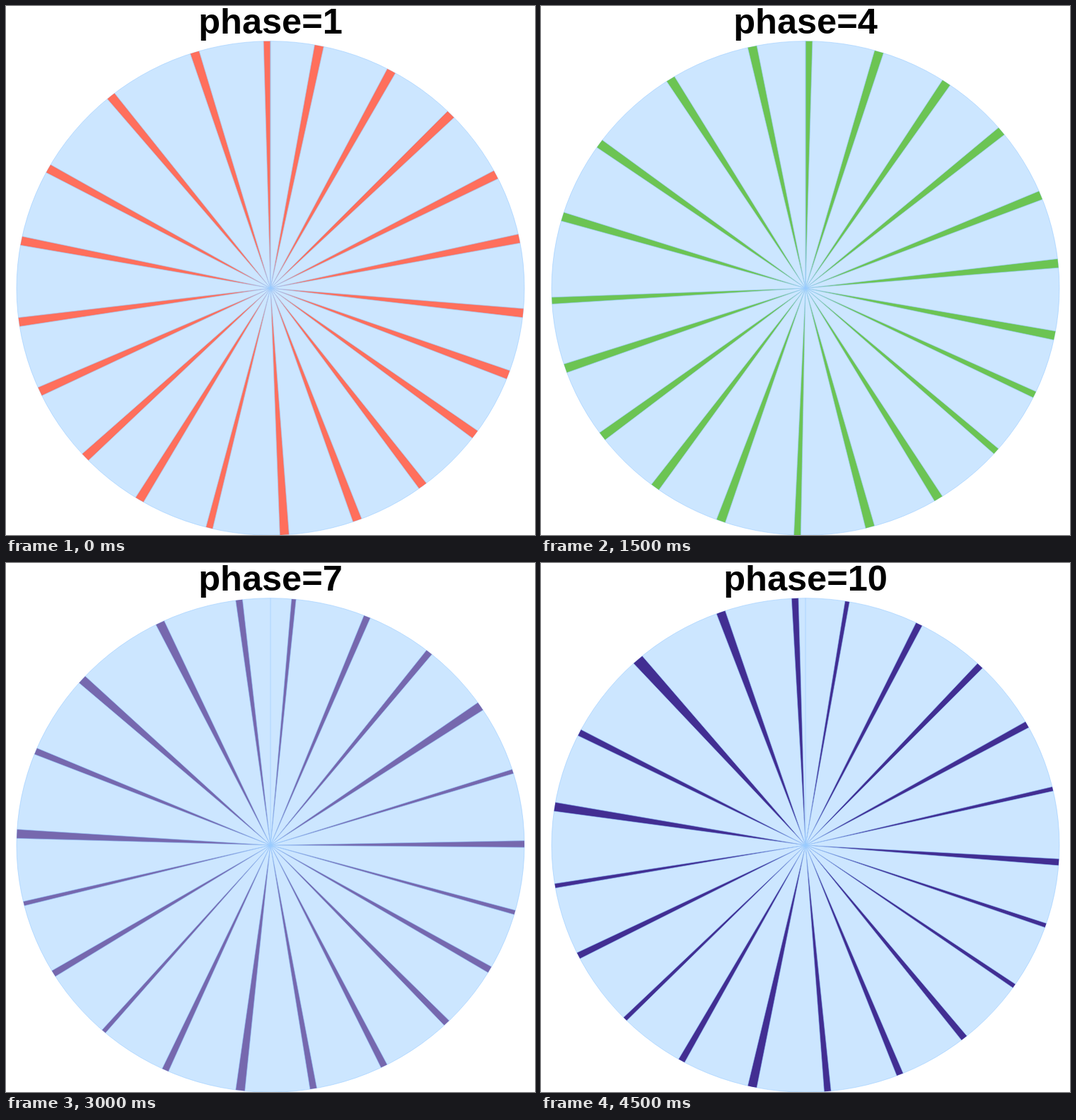
An HTML page with a canvas that plays this animation: 748 by 748 pixels, repeating every 5 s.

```html
<!DOCTYPE html>
<html lang="en">
<head>
<meta charset="utf-8">
<title>Phase wheel</title>
<style>
  html, body { margin: 0; width: 100%; height: 100%; overflow: hidden; background: #fff; }
  canvas { display: block; }
</style>
</head>
<body>
<canvas id="stage" width="748" height="748"></canvas>
<script>
const ctx = document.getElementById("stage").getContext("2d");
const CENTER = { x: 374, y: 399 };
const RADIUS = { x: 359, y: 349.3 };
const SAMPLES = 684;
const STEP_MS = 500;
const DISC = "#cce6ff";
const EDGE = "#99ccff";
const COLORS = ["#ff6f5c", "#ffb40c", "#b6bc2e", "#6cc453", "#82826c",
                "#7c758d", "#7668ae", "#5f62b1", "#485db4", "#422e92"];

// Sample positions where each cycle enters phase 1 and phase 6.
const HALF_CYCLES = [
  -9, 6.1, 19.2, 37.9, 52.2, 69.1, 84.3, 101.1, 117.2, 134.1, 147.2,
  165.9, 180.1, 197.4, 208.4, 223.9, 238.45, 254, 270.2, 287.1, 302.2,
  319.1, 334.45, 349.8, 366.9, 384.4, 399.2, 416.1, 429.2, 449, 464.2,
  482.9, 496.4, 512.55, 532.1, 550.9, 566.2, 587, 607.6, 629.2, 649.2,
  666.1, 681.2, 698
];

// Each half cycle holds five phases of equal length, rounded to whole samples.
function spokes(phase) {
  const list = [];
  const step = phase % 5;
  for (let i = phase < 5 ? 0 : 1; i < HALF_CYCLES.length - 1; i += 2) {
    const start = HALF_CYCLES[i];
    const width = (HALF_CYCLES[i + 1] - start) / 5;
    const from = Math.max(0, Math.round(start + step * width));
    const to = Math.min(SAMPLES, Math.round(start + (step + 1) * width));
    if (to > from) list.push([from, to]);
  }
  return list;
}

const angle = sample => sample / SAMPLES * 2 * Math.PI - Math.PI / 2;

function arc(from, to) {
  ctx.ellipse(CENTER.x, CENTER.y, RADIUS.x, RADIUS.y, 0, angle(from), angle(to));
}

function radius(sample) {
  const a = angle(sample);
  ctx.beginPath();
  ctx.moveTo(CENTER.x, CENTER.y);
  ctx.lineTo(CENTER.x + RADIUS.x * Math.cos(a), CENTER.y + RADIUS.y * Math.sin(a));
  ctx.stroke();
}

function draw(phase) {
  ctx.fillStyle = "#fff";
  ctx.fillRect(0, 0, 748, 748);

  ctx.lineWidth = 0.6;
  ctx.strokeStyle = EDGE;
  ctx.fillStyle = DISC;
  ctx.beginPath();
  arc(0, SAMPLES);
  ctx.fill();
  ctx.stroke();

  const list = spokes(phase);
  ctx.fillStyle = COLORS[phase];
  for (const [from, to] of list) {
    ctx.beginPath();
    ctx.moveTo(CENTER.x, CENTER.y);
    arc(from, to);
    ctx.fill();
  }
  radius(0);
  list.flat().forEach(radius);

  ctx.fillStyle = "#000";
  ctx.font = 'bold 50.5px "Liberation Sans", Arial, sans-serif';
  ctx.textAlign = "center";
  ctx.fillText("phase=" + (phase + 1), CENTER.x, 39);
}

const startTime = performance.now();
function tick() {
  const elapsed = performance.now() - startTime;
  draw(Math.floor(elapsed / STEP_MS) % COLORS.length);
  requestAnimationFrame(tick);
}
tick();
</script>
</body>
</html>
```
